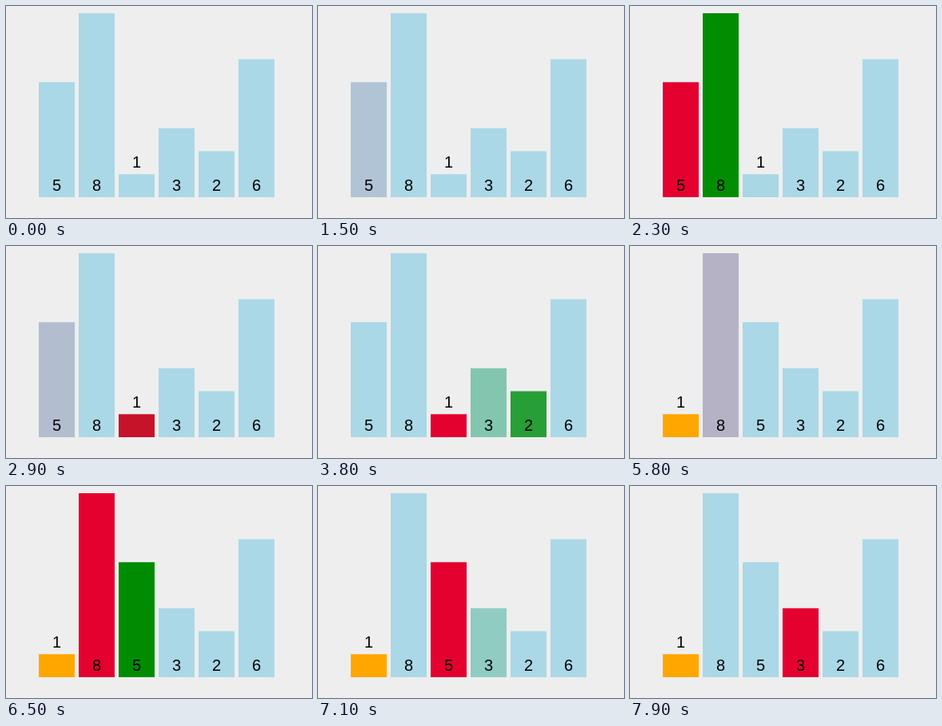
An HTML page for the animation above (8 s loop, 383 by 265 pixels).

```html
<!DOCTYPE html>
<html lang="en">
<head>
<meta charset="utf-8">
<title>Selection sort</title>
<style>
html, body { margin: 0; width: 100%; height: 100%; overflow: hidden; background: #eee; }
svg { display: block; width: 383px; height: 265px; }
text { font: 20px "Liberation Sans", Arial, sans-serif; text-anchor: middle; }
</style>
</head>
<body>
<svg id="stage" viewBox="0 0 383 265"></svg>
<script>
const NS = "http://www.w3.org/2000/svg";
const LOOP = 8000, FADE = 250;
const LEFT = 41, PITCH = 50, WIDTH = 45, BASE = 239, UNIT = 28.75;
const BLUE = [171, 216, 230], RED = [228, 0, 47], GREEN = [0, 140, 0], ORANGE = [255, 167, 0];
const values = [5, 8, 1, 3, 2, 6];

// Each step: start time, then new colours by bar value.
const steps = [
  [1430, { 5: RED }],
  [1790, { 8: GREEN }],
  [2270, { 8: BLUE, 1: GREEN }],
  [2730, { 5: BLUE, 1: RED }],
  [3192, { 3: GREEN }],
  [3648, { 3: BLUE, 2: GREEN }],
  [4030, { 2: BLUE, 6: GREEN }],
  [4430, { 6: BLUE, 5: RED }],
  [5270, { 1: ORANGE, 5: BLUE }],
  [5713, { 8: RED }],
  [6230, { 5: GREEN }],
  [6630, { 8: BLUE, 5: RED }],
  [7016, { 3: GREEN }],
  [7490, { 5: BLUE, 3: RED }]
];
const swap = { start: 4830, to: { 5: 2, 1: 0 } };

const svg = document.getElementById("stage");

function add(parent, tag, attrs) {
  const el = document.createElementNS(NS, tag);
  for (const k in attrs) el.setAttribute(k, attrs[k]);
  return parent.appendChild(el);
}

add(svg, "rect", { width: 383, height: 265, fill: "#eee" });

const bars = values.map((value, slot) => {
  const group = add(svg, "g", {});
  const height = value * UNIT;
  const rect = add(group, "rect", { y: BASE - height, width: WIDTH, height });
  const y = value === 1 ? 202 : 231;
  add(group, "text", { x: WIDTH / 2, y }).textContent = value;
  return { value, slot, group, rect };
});

function progress(t, start) {
  const u = Math.min(1, Math.max(0, (t - start) / FADE));
  return u < 0.5 ? 4 * u ** 3 : 1 - 4 * (1 - u) ** 3;
}

const mix = (a, b, p) => a + (b - a) * p;

function colorAt(value, t) {
  let color = BLUE;
  for (const [start, changes] of steps) {
    if (t <= start) break;
    const next = changes[value];
    if (next) {
      const p = progress(t, start);
      color = color.map((c, i) => mix(c, next[i], p));
    }
  }
  return `rgb(${color.map(Math.round)})`;
}

function draw(t) {
  const moved = progress(t, swap.start);
  for (const { value, slot, group, rect } of bars) {
    const place = mix(slot, swap.to[value] ?? slot, moved);
    group.setAttribute("transform", `translate(${LEFT + PITCH * place} 0)`);
    rect.setAttribute("fill", colorAt(value, t));
  }
}

const began = performance.now();
function tick() {
  draw((performance.now() - began) % LOOP);
  requestAnimationFrame(tick);
}
tick();
</script>
</body>
</html>
```
